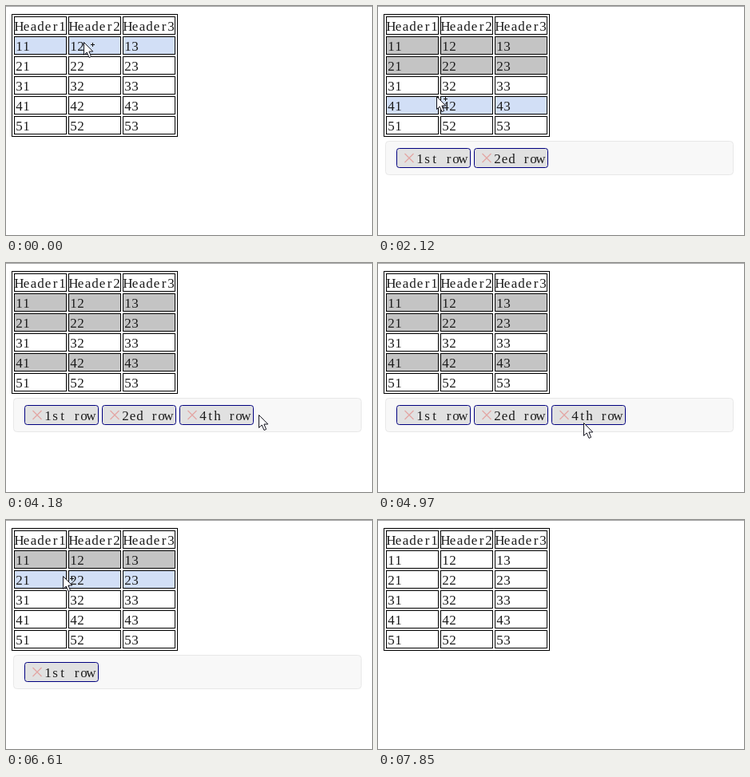
An HTML page for the animation above (8.4 s loop, 458 by 287 pixels).

```html
<!DOCTYPE html>
<html lang="en">
<head>
<meta charset="utf-8">
<title>Row picker</title>
<style>
  html, body { margin: 0; width: 100%; height: 100%; overflow: hidden; background: #fff; }
  svg { display: block; width: 458px; height: 287px; }
  text { font: 17px "Liberation Serif", serif; fill: #1c1c1c; text-anchor: middle; }
  .row { fill: #fff; }
  .row.hover { fill: #d2dff6; }
  .row.picked { fill: #c4c4c4; }
  .cell { stroke: #000; }
  .tag { fill: #e1e1e1; stroke: #000080; }
  .cross { stroke: #e3a5a2; stroke-width: 1.2; fill: none; }
  .panel { fill: #f8f8f8; stroke: #e8e8e8; }
  .arrow { fill: #fff; stroke: #15151f; stroke-linejoin: round; }
  .plus { stroke: #111; fill: none; }
</style>
</head>
<body>
<svg viewBox="0 0 458 287">
  <rect width="458" height="1" fill="#a3a3a3"/>
  <rect x="7.5" y="10.5" width="207" height="153" fill="#fff" stroke="#000"/>
  <g id="table"></g>
  <g id="panel">
    <rect class="panel" x="9.5" y="169.5" width="435" height="42" rx="4"/>
  </g>
  <g id="tags"></g>
  <g id="cursor">
    <path class="arrow" d="M.5 .5V16.5L4.2 13 7 19.5 9.6 18.4 6.9 12H11.8Z"/>
    <path id="plus" class="plus" d="M9 3.5h5M11.5 1v5"/>
  </g>
</svg>
<script>
const LOOP = 8400, STEP = 140;
const TOP = 13, PITCH = 25, ROWS = 5;
const HOME = { x: 97, y: 45 };

// Pointer moves
const moves = [
  { from: 130, to: 250, x: 72, y: 50 },
  { from: 550, to: 1280, x: 78, y: 78 },
  { from: 1550, to: 2120, x: 73, y: 113 },
  { from: 2560, to: 2850, x: 75, y: 145 },
  { from: 3130, to: 3290, x: 286, y: 216 },
  { from: 3410, to: 4060, x: 326, y: 188 },
  { from: 4180, to: 4970, x: 257, y: 200 },
  { from: 5110, to: 5500, x: 230, y: 190 },
  { from: 5500, to: 6190, x: 76, y: 74 },
  { from: 6350, to: 6610, x: 71, y: 70 },
  { from: 6740, to: 7300, x: 64, y: 52 },
  { from: 7450, to: 7850, x: 90, y: 300 }
];

// Rows are picked in this order and dropped in reverse
const picks = [
  { row: 1, label: '1st', on: 550, off: 7450 },
  { row: 2, label: '2ed', on: 1550, off: 6350 },
  { row: 4, label: '4th', on: 2560, off: 5500 },
  { row: 5, label: '5th', on: 3130, off: 4180 }
];

const $ = id => document.getElementById(id);

// Fixed-pitch text: each letter centred in a 9px cell
function mono(x, y, s) {
  const xs = [...s].map((_, i) => x + 4.5 + 9 * i).join(' ');
  return `<text x="${xs}" y="${y}">${s}</text>`;
}

function rowMarkup(r) {
  const y = TOP + PITCH * r;
  const cells = [1, 2, 3].map(c => {
    const x = 68 * c - 58;
    return `<rect class="cell" x="${x + .5}" y="${y + .5}" width="65" height="22"/>` +
      mono(x + 2, y + 18, (r || 'Header') + String(c));
  });
  return `<g class="row">${cells.join('')}</g>`;
}

function tagMarkup({ label }, i) {
  return `<g transform="translate(${23 + 97 * i} 178)">
    <rect class="tag" x=".5" y=".5" width="92" height="24" rx="3"/>
    <path class="cross" d="M10.5 7l11 11M21.5 7l-11 11"/>
    ${mono(25, 19, label + ' row')}</g>`;
}

$('table').innerHTML = Array.from({ length: ROWS + 1 }, (_, r) => rowMarkup(r)).join('');
$('tags').innerHTML = picks.map(tagMarkup).join('');
const rows = [...$('table').children];
const tags = [...$('tags').children];

// The pointer moves in jumps, the first at the start of a move, the last at its end
function pointer(t) {
  let { x, y } = HOME;
  for (const m of moves) {
    if (t < m.from) break;
    const n = Math.max(1, Math.round((m.to - m.from) / STEP));
    const k = Math.min(1, (1 + Math.floor((t - m.from) / (m.to - m.from) * n)) / (n + 1));
    x += (m.x - x) * k;
    y += (m.y - y) * k;
  }
  return { x: Math.round(x), y: Math.round(y) };
}

function show(el, on) {
  el.style.visibility = on ? 'visible' : 'hidden';
}

function draw(t) {
  const { x, y } = pointer(t);
  const overTable = x >= 7 && x < 215 && y >= 10 && y < 164;
  const inCell = (y - TOP) % PITCH < 23;
  const hovered = overTable && inCell ? Math.floor((y - TOP) / PITCH) : 0;
  const active = picks.filter(p => t >= p.on && t < p.off);

  rows.forEach((el, r) => {
    const picked = active.some(p => p.row === r);
    el.classList.toggle('picked', picked);
    el.classList.toggle('hover', !picked && r > 0 && r === hovered);
  });
  tags.forEach((el, i) => show(el, active.includes(picks[i])));
  show($('panel'), active.length > 0);
  show($('plus'), overTable);
  $('cursor').setAttribute('transform', `translate(${x} ${y})`);
}

const start = performance.now();
function tick() {
  draw((performance.now() - start + 2) % LOOP);
  requestAnimationFrame(tick);
}
tick();
</script>
</body>
</html>
```
